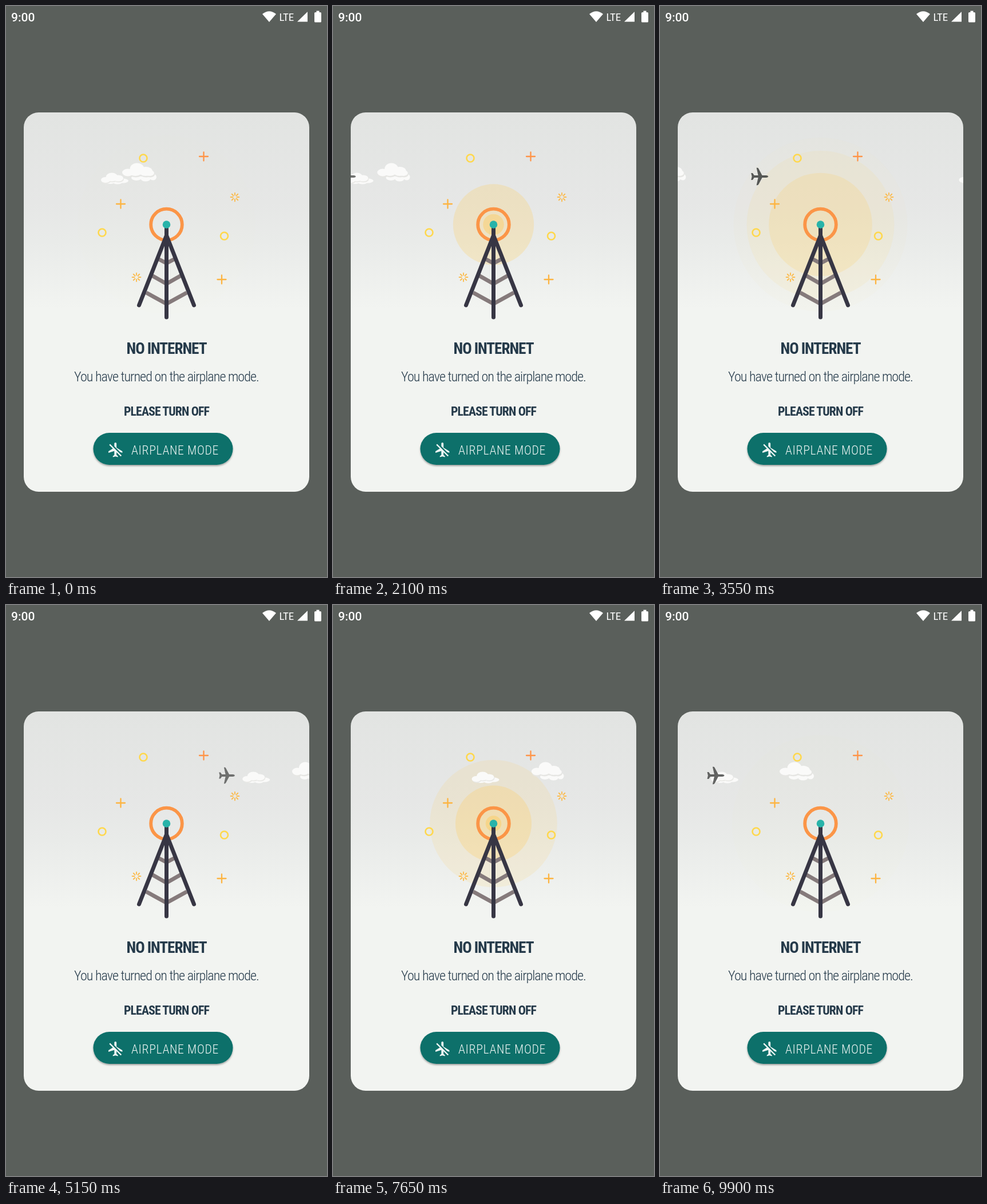
Recreate the animation shown at these times as an HTML page. Size 561 px wide and 998 px high, loop 9950 ms.

```html
<!DOCTYPE html>
<html lang="en">
<head>
<meta charset="utf-8">
<title>No internet</title>
<style>
html, body { margin: 0; width: 100%; height: 100%; overflow: hidden; background: #5a5f5b; }
svg { display: block; width: 561px; height: 998px; }
.bar { font: 500 21px Roboto, sans-serif; fill: #fff; }
.bar .net { font: 400 19px "Roboto Condensed", Roboto, sans-serif; }
.copy text {
  font-family: "Roboto Condensed", "Open Sans Condensed", "Noto Sans", "Open Sans", sans-serif;
  font-stretch: extra-condensed; text-anchor: middle; fill: #253a4a; letter-spacing: -.04em;
}
.copy .head { font-weight: 600; }
.copy .body { font-weight: 350; }
.copy .label { font-weight: 350; fill: #f1f7f5; letter-spacing: .03em; }
</style>
</head>
<body>
<svg viewBox="0 0 561 998" xmlns="http://www.w3.org/2000/svg">
  <defs>
    <linearGradient id="sky" gradientUnits="userSpaceOnUse" x1="0" y1="186" x2="0" y2="849">
      <stop offset="0" stop-color="#e2e4e2"/>
      <stop offset=".24" stop-color="#e6e7e6"/>
      <stop offset=".34" stop-color="#e9ebe9"/>
      <stop offset=".52" stop-color="#f2f4f1"/>
    </linearGradient>
    <clipPath id="card"><rect x="31" y="186" width="499" height="663" rx="26"/></clipPath>
    <filter id="shade" x="-10%" y="-20%" width="120%" height="150%">
      <feDropShadow dx="0" dy="2" stdDeviation="1.8" flood-color="#000" flood-opacity=".35"/>
    </filter>
    <g id="bigTop">
      <ellipse cx="-20" cy="0" rx="10" ry="6.500"/><ellipse cx="-4" cy="-6" rx="12.500" ry="10.500"/>
      <ellipse cx="11" cy="-2" rx="12" ry="8"/><ellipse cx="18" cy="1" rx="8" ry="5"/>
      <ellipse cx="-7" cy="1" rx="10" ry="5"/>
    </g>
    <g id="smallTop">
      <ellipse cx="-16" cy="2" rx="8" ry="5"/><ellipse cx="-5" cy="-3" rx="10.500" ry="7.500"/>
      <ellipse cx="6" cy="-1" rx="9" ry="5.500"/>
    </g>
  </defs>

  <rect width="561" height="998" fill="#5a5f5b"/>
  <g class="bar">
    <text x="9" y="27">9:00</text>
    <text class="net" x="477.500" y="25.500">LTE</text>
    <path d="M448 14Q460 4.500 472 14L460 28Z"/>
    <path d="M527 10V27.500H509Z"/>
    <path d="M542.500 8.500h5v2.500h2q1.500 0 1.500 1.500v14.500q0 1.500-1.500 1.500h-9q-1.500 0-1.500-1.500v-14.500q0-1.500 1.500-1.500h2z"/>
  </g>

  <rect x="31" y="186" width="499" height="663" rx="26" fill="url(#sky)"/>
  <g clip-path="url(#card)">
    <g id="waves" fill="#ffc850"></g>
    <g id="big" fill="#fafaf9">
      <ellipse cx="24" cy="8" rx="6" ry="5.500"/><ellipse cx="11" cy="10" rx="9" ry="5.500"/>
      <ellipse cx="-5" cy="9" rx="9" ry="5"/>
      <use href="#bigTop" x="1" y="2.500" fill="#e6e6e3"/>
      <use href="#bigTop"/>
    </g>
    <g id="small" fill="#fafaf9">
      <ellipse cx="14" cy="3.500" rx="10" ry="4"/><ellipse cx="-8" cy="5.500" rx="8" ry="3.500"/>
      <ellipse cx="5" cy="6" rx="8" ry="3.500"/>
      <use href="#smallTop" x="1" y="1.800" fill="#e9e9e6"/>
      <use href="#smallTop"/>
    </g>
    <path id="plane" fill="#4b4d4b" d="M15.500 0Q14.500-2.100 11.500-2.100H4.500L-1.800-14Q-2.600-15.500-4-15.500H-5.500L-2.500-2.100H-9.500L-12.300-6H-15L-13.600 0L-15 6H-12.300L-9.500 2.100H-2.500L-5.500 15.500H-4Q-2.600 15.500-1.800 14L4.500 2.100H11.500Q14.500 2.100 15.500 0Z"/>
  </g>

  <g id="marks" fill="none" stroke-linecap="round"></g>

  <g fill="none" stroke-width="7">
    <circle cx="280.500" cy="382" r="27.300" stroke="#fb9547" stroke-width="5.800"/>
    <path stroke="#857a7b" d="M245 501L280.500 520.500L316 501M255 471L280.500 485.500L306 471M266 442L280.500 449.500L295 442"/>
    <path stroke="#373644" stroke-linecap="round" stroke-linejoin="round" d="M280.500 385V544M232.500 523L280.500 401L328.500 523"/>
  </g>
  <circle cx="280.500" cy="382" r="6.800" fill="#28b3a9"/>

  <rect x="152.500" y="746" width="244" height="56" rx="28" fill="#0b706b" filter="url(#shade)"/>
  <path transform="translate(176.500 760.400) scale(1.280)" fill="#f1f7f5" d="M13 9V3.500c0-.83-.67-1.500-1.500-1.500S10 2.670 10 3.500v3.680l7.830 7.830L21 16v-2l-8-5zM3 5.270l4.990 4.990L2 14v2l8-2.500V19l-2 1.500V22l3.500-1 3.500 1v-1.500L13 19v-3.730L18.730 21 20 19.730 4.270 4 3 5.270z"/>
  <g class="copy" id="copy"></g>
</svg>
<script>
const NS = 'http://www.w3.org/2000/svg';
const $ = id => document.getElementById(id);
const mod = (a, n) => ((a % n) + n) % n;

function add(parent, tag, attrs) {
  const el = document.createElementNS(NS, tag);
  for (const k in attrs) el.setAttribute(k, attrs[k]);
  return parent.appendChild(el);
}

// Choose the largest even size that suits both the line and its cap height.
function line(cls, str, x, mid, width, cap) {
  const el = add($('copy'), 'text', { class: cls, x, 'font-size': 20 });
  el.textContent = str;
  const size = Math.min(cap / 0.711, 20 * width / el.getComputedTextLength());
  el.setAttribute('font-size', size.toFixed(2));
  el.setAttribute('y', (mid + 0.355 * size).toFixed(2));
}
line('head', 'NO INTERNET', 280.5, 598, 140, 24);
line('body', 'You have turned on the airplane mode.', 280.5, 647.5, 323, 20);
line('head', 'PLEASE TURN OFF', 280.5, 708.5, 149, 19);
line('label', 'AIRPLANE MODE', 295.5, 776.5, 153, 18);

const marks = $('marks');
for (const [cx, cy] of [[240, 266], [168, 396], [381.5, 402]])
  add(marks, 'circle', { cx, cy, r: 6.5, stroke: '#ffd84d', 'stroke-width': 2.6 });
for (const [x, y, stroke] of [[345.5, 263, '#ff9447'], [200.5, 346, '#fdb441'], [377, 478, '#fdb441']])
  add(marks, 'path', { d: `M${x - 7.5} ${y}h15M${x} ${y - 7.5}v15`, stroke, 'stroke-width': 2.3 });
for (const [x, y] of [[400, 334], [228, 474]])
  for (let a = 0; a < 360; a += 45)
    add(marks, 'path', {
      d: 'M3.6 0H7.4', stroke: '#fbbc50', 'stroke-width': 1.9,
      transform: `translate(${x} ${y}) rotate(${a})`
    });

const waves = [0, 1, 2].map(() => add($('waves'), 'circle', { cx: 280.5, cy: 382 }));

const LOOP = 9950, STEP = 50, WAVE = 2.7;

function drift(x, speed, t, span, low) {
  return low + mod(x - speed * t - low, span);
}

function draw(ms) {
  const t = Math.floor(mod(ms, LOOP) / STEP) * STEP / 1000;

  waves.forEach((c, i) => {
    const u = mod(t - 1.3 - 0.6 * i, 5) / WAVE;
    const on = u < 1;
    c.setAttribute('r', on ? 157.4 * Math.sin(u * Math.PI / 2) : 0);
    c.setAttribute('opacity', on ? 0.45 * Math.pow(1 - u, 1.8) : 0);
  });

  const squash = 0.94 + 0.06 * Math.cos(t * Math.PI / 5);
  $('big').setAttribute('transform',
    `translate(${drift(233, 60.5, t, 605, -20)} 291) scale(${squash} 1)`);
  $('small').setAttribute('transform', `translate(${drift(190, 68.3, t, 599, -10)} 302)`);

  const p = (1 - Math.cos(Math.PI * mod(t - 0.85, 7) / 7)) / 2;
  const x = -21.5 + 603 * p;
  const size = 0.99 - 0.22 * Math.max(0, p - 0.32);
  $('plane').setAttribute('transform', `translate(${x} 298) scale(${size})`);
  $('plane').setAttribute('opacity', 0.96 - 0.6 * Math.abs(p - 0.36));
}

function tick(now) {
  draw(now);
  requestAnimationFrame(tick);
}
draw(0);
requestAnimationFrame(tick);
</script>
</body>
</html>
```
